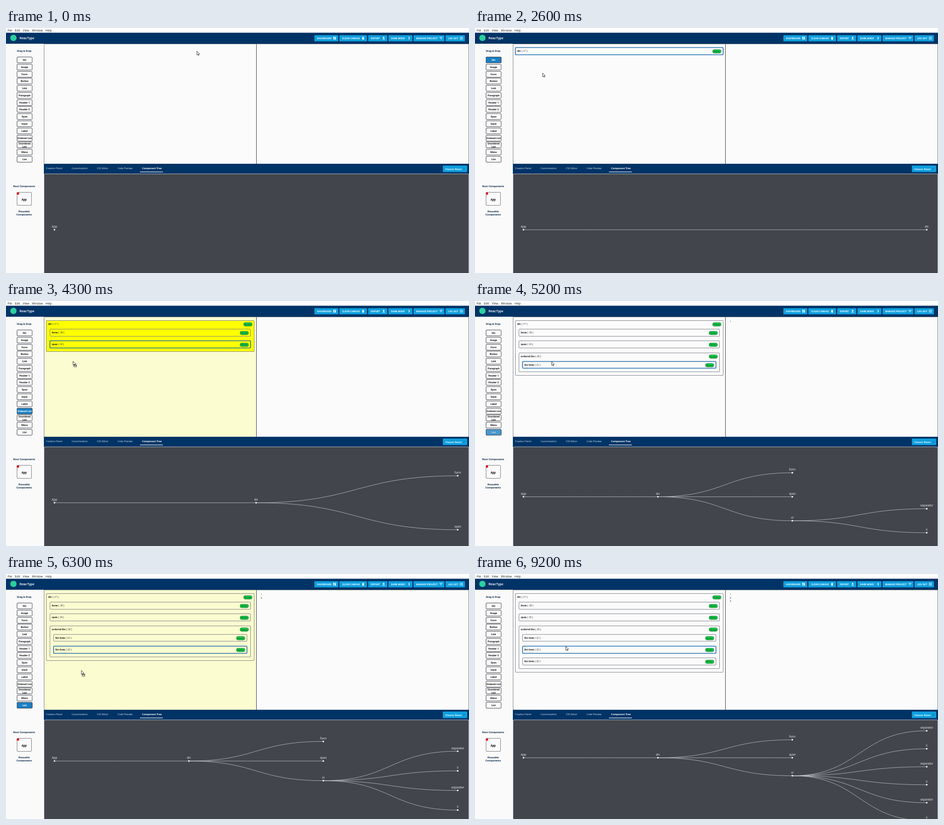
An HTML page for the animation above (9.3 s loop, 1027 by 545 pixels).

```html
<!DOCTYPE html>
<html lang="en">
<head>
<meta charset="utf-8">
<title>Component builder</title>
<style>
  html, body { margin: 0; width: 100%; height: 100%; overflow: hidden; background: #fafafa; }
  svg { display: block; width: 100%; height: 100%; }
  text { font-family: Roboto, sans-serif; white-space: pre; }
  .bar { font-family: "Open Sans", sans-serif; }
  .serif { font-family: "Liberation Serif", serif; }
</style>
</head>
<body>
<svg id="stage" viewBox="0 0 1027 545" preserveAspectRatio="none">
  <g id="back"></g>
  <g id="live"></g>
  <g id="cursor">
    <path id="arrow" d="M0 0V8.6L2 6.8L3.3 9.7L4.6 9.1L3.3 6.3H6Z" fill="#fff" stroke="#111" stroke-width=".8"/>
    <path id="dragBox" d="M2 8H7.6V12.5H2Z M2 9.5H7.6" fill="#fff" stroke="#222" stroke-width=".9"/>
    <path id="hand" d="M0 .8Q.8-.3 1.6.8V4L5.3 4.9Q6.2 5.2 6 6.3L5.3 9.4H1.5L-1.5 5.7Q-1.3 4.6 0 5.5Z" fill="#fff" stroke="#111" stroke-width=".8"/>
  </g>
</svg>
<script>
const LOOP = 9300, STEP = 100, FADE = 500;
const NAVY = '#003366', BLUE = '#0e9fdd', PAPER = '#fbfbfb';
const $ = id => document.getElementById(id);
const crisp = v => Math.floor(v) + .5;

const rect = (x, y, w, h, fill, extra = '') =>
  `<rect x="${x}" y="${y}" width="${w}" height="${h}" fill="${fill}" ${extra}/>`;
const line = (d, color, width = 1) =>
  `<path d="${d}" fill="none" stroke="${color}" stroke-width="${width}"/>`;
const dot = (x, y, r, fill) => `<circle cx="${x}" cy="${y}" r="${r}" fill="${fill}"/>`;
const text = (x, y, size, fill, str, extra = '') =>
  `<text x="${x}" y="${y}" font-size="${size}" fill="${fill}" ${extra}>${str}</text>`;
const spaced = (words, gap) => words.map((w, i) => `<tspan dx="${i ? gap : 0}">${w}</tspan>`).join('');
const MID = 'text-anchor="middle"', BOLD = 'font-weight="700"', MEDIUM = 'font-weight="500"';

// ---- Static interface ----
const palette = ['Div', 'Image', 'Form', 'Button', 'Link', 'Paragraph', 'Header 1', 'Header 2',
  'Span', 'Input', 'Label', 'Ordered List', 'Unordered List', 'Menu', 'List'];
const paletteY = i => 71 + i * 15.78;

function paletteItem(i, fill, ink) {
  const y = paletteY(i), words = palette[i].split(' ');
  const label = (str, dy) => text(41.2, y + 2 + dy, 5.7, ink, str, `${MID} ${BOLD}`);
  return rect(24.5, crisp(y - 6.5), 33.5, 13, fill, 'rx="1.5" stroke="#3c3f4a"') +
    (palette[i].length > 12 ? label(words[0], -3.4) + label(words[1], 3.4) : label(palette[i], 0));
}

const icons = {
  grid: rect(0, 0, 2.6, 3.4, '#fff') + rect(0, 4.1, 2.6, 1.9, '#fff') +
    rect(3.4, 0, 2.6, 1.9, '#fff') + rect(3.4, 2.6, 2.6, 3.4, '#fff'),
  trash: rect(.2, 0, 4.6, .9, '#fff') + rect(.6, 1.4, 3.8, 4.8, '#fff'),
  download: `<path d="M2 0H4V2.2H5.5L3 4.7L.5 2.2H2ZM.3 5.4H5.7V6.3H.3Z" fill="#fff"/>`,
  moon: `<path d="M2 0A3 3 0 0 1 2 6A4.4 4.4 0 0 0 2 0Z" fill="#fff"/>`,
  filter: line('M0 1H7M1.2 3H5.8M2.6 5H4.4', '#fff', .9),
  exit: line('M.5 2V.5H5.7V5.6H.5V4.2M0 3.1H3.8M2.6 1.8L3.9 3.1L2.6 4.4', '#fff', .8)
};
const buttons = [['DASHBOARD', 684, 'grid'], ['CLEAR CANVAS', 739.5, 'trash'], ['EXPORT', 803.3, 'download'],
  ['DARK MODE', 848.3, 'moon'], ['MANAGE PROJECT', 904, 'filter'], ['LOG OUT', 975, 'exit']];

function drawButton([label, x, icon], i) {
  const right = (buttons[i + 1] || ['', 1020.5])[1] - 2.6;
  return rect(x, 16, right - x, 13.8, BLUE, 'rx="1.5"') +
    text(x + 6, 24.7, 5.1, '#fff', label, `${BOLD} letter-spacing=".2"`) +
    `<g transform="translate(${right - 11} 19.6)">${icons[icon]}</g>`;
}

function drawBack() {
  const heading = (y, str) => text(40.3, y, 6, '#12304f', str, `${MID} ${BOLD}`);
  return rect(0, 0, 1027, 10.5, '#fff') +
    text(3.5, 7.6, 6.4, '#222', spaced(['File', 'Edit', 'View', 'Window', 'Help'], 6.2), 'class="bar"') +
    rect(0, 10.5, 1027, 24.5, NAVY) + dot(16.5, 22, 7, '#2bcf9f') +
    text(30, 24.8, 7.5, '#fff', 'ReacType', MEDIUM) + buttons.map(drawButton).join('') +
    heading(52.6, 'Drag &amp; Drop') + palette.map((_, i) => paletteItem(i, PAPER, '#1a1a1a')).join('') +
    heading(354, 'Root Components') + rect(24.5, 365.5, 32, 29, PAPER, 'rx="1.5" stroke="#777"') +
    dot(26.5, 368.2, 2.7, '#e8101c') + text(40.2, 384.3, 6.4, '#111', 'App', `${MID} ${BOLD}`) +
    heading(410, 'Reusable') + heading(417.4, 'Components') +
    rect(84, 302, 943, 23, NAVY) +
    text(88.8, 314, 5.3, '#e4ebf2', spaced(['Creation Panel', 'Customization', 'CSS Editor', 'Code Preview'], 20.6), 'class="bar"') +
    text(301.8, 314, 5.3, '#fff', 'Component Tree', `class="bar" ${BOLD}`) +
    rect(297, 319.6, 51, 1.2, '#fff') +
    rect(969, 306, 54, 14.6, BLUE, 'rx="1.5"') + text(974.3, 315.5, 6.1, '#fff', 'Classic React', MEDIUM) +
    `<path d="M1014 312.7H1018L1016 314.6Z" fill="#174a6c"/>` +
    rect(84.5, 324.5, 942, 225, '#42464c', 'rx="2.5" stroke="#b9bec4"');
}

// ---- Drag story: what is dropped, over which box, when and where ----
const actions = [
  { item: 'Div', over: 0, at: 2600, x: 150, y: 100 },
  { item: 'Form', over: 17, at: 3000, x: 135, y: 60 },
  { item: 'Span', over: 17, at: 3650, x: 150, y: 80 },
  { item: 'Ordered List', over: 17, at: 4400, x: 150, y: 106 },
  { item: 'List', over: 20, at: 5100, x: 170, y: 134.5 },
  { item: 'List', over: 20, at: 5900, x: 168, y: 152 },
  { item: 'List', over: 22, at: 6400, x: 174, y: 165 },
  { move: 23, over: 22, at: 7600, x: 188, y: 154 }
];
const home = { at: 1700, x: 423.5, y: 51.5 }, rest = { x: 201.5, y: 161 };

actions.forEach((a, i) => {
  const prev = actions[i - 1] || home, span = a.at - prev.at;
  a.prev = prev;
  a.index = palette.indexOf(a.item);
  a.leave = i ? prev.at + span * .15 : 400;
  a.arrive = prev.at + span * .25;
  a.grab = prev.at + span * .35;
  a.from = a.item ? { x: 40, y: paletteY(a.index) - 3 } : { x: 188, y: 184 };
});

const ease = (t, from, to) => {
  const u = Math.min(1, Math.max(0, (t - from) / (to - from)));
  return u * u * (3 - 2 * u);
};
const mix = (a, b, u) => ({ x: a.x + (b.x - a.x) * u, y: a.y + (b.y - a.y) * u });

function pointer(t) {
  const a = actions.find(a => t < a.at);
  if (!a) {
    const last = actions[actions.length - 1];
    return mix(last, rest, ease(t, last.at, last.at + 500));
  }
  if (t < a.grab) return mix(a.prev, a.from, ease(t, a.leave, a.arrive));
  // Drags sweep sideways out of the palette, then up.
  const u = ease(t, a.grab, a.at), corner = { x: a.x, y: a.from.y };
  return mix(mix(a.from, corner, u), mix(corner, a, u), u);
}

function buildApp(t) {
  const nodes = { 0: { name: 'App', id: 0, kids: [] } };
  let id = 16;
  for (const a of actions.filter(a => a.at <= t)) {
    const over = nodes[a.over];
    if (a.item) {
      const name = a.item === 'List' ? 'list item' : a.item.toLowerCase();
      nodes[++id] = { name, id, kids: [] };
      over.kids.push(nodes[id]);
    } else {
      const moved = nodes[a.move];
      const list = Object.values(nodes).find(n => n.kids.includes(over));
      over.kids = over.kids.filter(k => k !== moved);
      list.kids.splice(list.kids.indexOf(over), 0, moved);
    }
  }
  return { app: nodes[0], list: nodes[20], selected: id };
}

// ---- Canvas boxes ----
const HEAD = 19.2, LEAF = 15.6, GAP = 10.6, PAD = 8;
const boxHeight = n => n.kids.length
  ? HEAD + n.kids.reduce((sum, k) => sum + boxHeight(k), 0) + GAP * (n.kids.length - 1) + PAD
  : LEAF;

function drawBox(n, x, y, selected, target) {
  const right = 640 - x, active = n.id === selected;
  const top = crisp(y), bottom = crisp(y + boxHeight(n));
  const style = `rx="1.5" stroke="${active ? '#1768ad' : '#7d8087'}" stroke-width="${active ? 1.6 : 1}"`;
  let out = rect(x, top, right - x, bottom - top, n.id === target ? '#ff0' : 'none', style) +
    `<text class="serif" x="${x + 4}" y="${y + 9.4}" font-size="6.3" fill="#111"><tspan ${BOLD}>${n.name}</tspan>` +
    `<tspan font-size="5.9"> ( ${n.id} )</tspan></text>` +
    rect(right - 23.4, y + 4.6, 18.8, 7.8, '#16d64b', 'rx="3.9" stroke="#17602b" stroke-width=".8"') +
    text(right - 14, y + 10.5, 5.4, '#0c3d1b', 'Notes', MID);
  let kidY = y + HEAD;
  for (const kid of n.kids) {
    out += drawBox(kid, x + 8, kidY, selected, target);
    kidY += boxHeight(kid) + GAP;
  }
  return out;
}

// A nested item shares its parent's line, so its number covers the parent's.
const drawPreview = list => list.kids.map((item, i) => {
  const nested = item.kids.length;
  return text(564.8, 47.2 + i * 7.6, 6.3, i ? '#222' : '#7a6a1c', `${i + 1 + nested}.`,
    `class="serif" ${nested ? BOLD : ''}`);
}).join('');

// ---- Tidy tree ----
const treeLabel = name => name === 'ordered list' ? 'ol' : name === 'list item' ? 'li' : name;

function drawTree(app) {
  const all = [];
  (function place(n, x, depth, parent) {
    const me = { label: treeLabel(n.name), x, depth, parent };
    all.push(me);
    const kids = n.kids.flatMap(k => k.name === 'list item' ? [{ name: 'separator', kids: [] }, k] : [k]);
    kids.forEach((k, i) => place(k, x + i - (kids.length - 1) / 2, depth + 1, me));
  })(app, 0, 0, null);

  const left = all.reduce((a, b) => b.x < a.x ? b : a);
  const right = all.reduce((a, b) => b.x > a.x ? b : a);
  const margin = left !== right && left.parent === right.parent ? .5 : 1;
  const scale = 240 / (right.x - left.x + 2 * margin);
  const levels = Math.max(1, ...all.map(n => n.depth));
  for (const n of all) {
    n.px = 107.5 + 894.5 * n.depth / levels;
    n.py = 328.8 + (n.x - left.x + margin) * scale;
  }
  return all.filter(n => n.parent).map(({ px, py, parent: p }) => {
    const mid = (px + p.px) / 2;
    return line(`M${p.px} ${p.py}C${mid} ${p.py} ${mid} ${py} ${px} ${py}`, '#c9ccd0', .8);
  }).join('') + all.map(n => dot(n.px, n.py, 1.8, '#fff') +
    text(n.px, n.py - 4.7, 6.7, '#dcdfe2', n.label, MID)).join('');
}

// ---- Playback ----
function drawLive(t) {
  const { app, list, selected } = buildApp(t);
  const drag = actions.find(a => t >= a.grab && t < a.at);
  const progress = drag ? ease(t, drag.grab, drag.at) : 0;
  const target = progress > .82 ? drag.over : -1;
  const hovers = actions.filter(a => a.item && t >= a.arrive && t < a.at + FADE).map(a =>
    `<g opacity="${Math.min(1, 1 - (t - a.at) / FADE)}">${paletteItem(a.index, '#1b80c3', '#fff')}</g>`).join('');
  return hovers + rect(85, 36, 470, 266, progress > .5 ? '#fbfcd0' : PAPER) + rect(556, 36, 470, 266, PAPER) +
    line('M84.5 302V35.5H1026.5V302', '#777d85') + line('M555.5 36V302', '#33363a') +
    app.kids.map(n => drawBox(n, 89.5, 43.5, selected, target)).join('') +
    (list ? drawPreview(list) : '') + drawTree(app);
}

function show(id, on) { $(id).style.display = on ? '' : 'none'; }

function render(t) {
  $('live').innerHTML = drawLive(t);
  const { x, y } = pointer(t);
  $('cursor').setAttribute('transform', `translate(${x} ${y})`);
  const hand = actions.some(a => a.item && t >= a.arrive && t < a.grab);
  show('hand', hand);
  show('arrow', !hand);
  show('dragBox', actions.some(a => t >= a.grab && t < a.at));
}

$('back').innerHTML = drawBack();
const start = performance.now();
let shown = -1;
(function frame() {
  const t = Math.floor((performance.now() - start) % LOOP / STEP) * STEP;
  if (t !== shown) render(shown = t);
  requestAnimationFrame(frame);
})();
</script>
</body>
</html>
```
